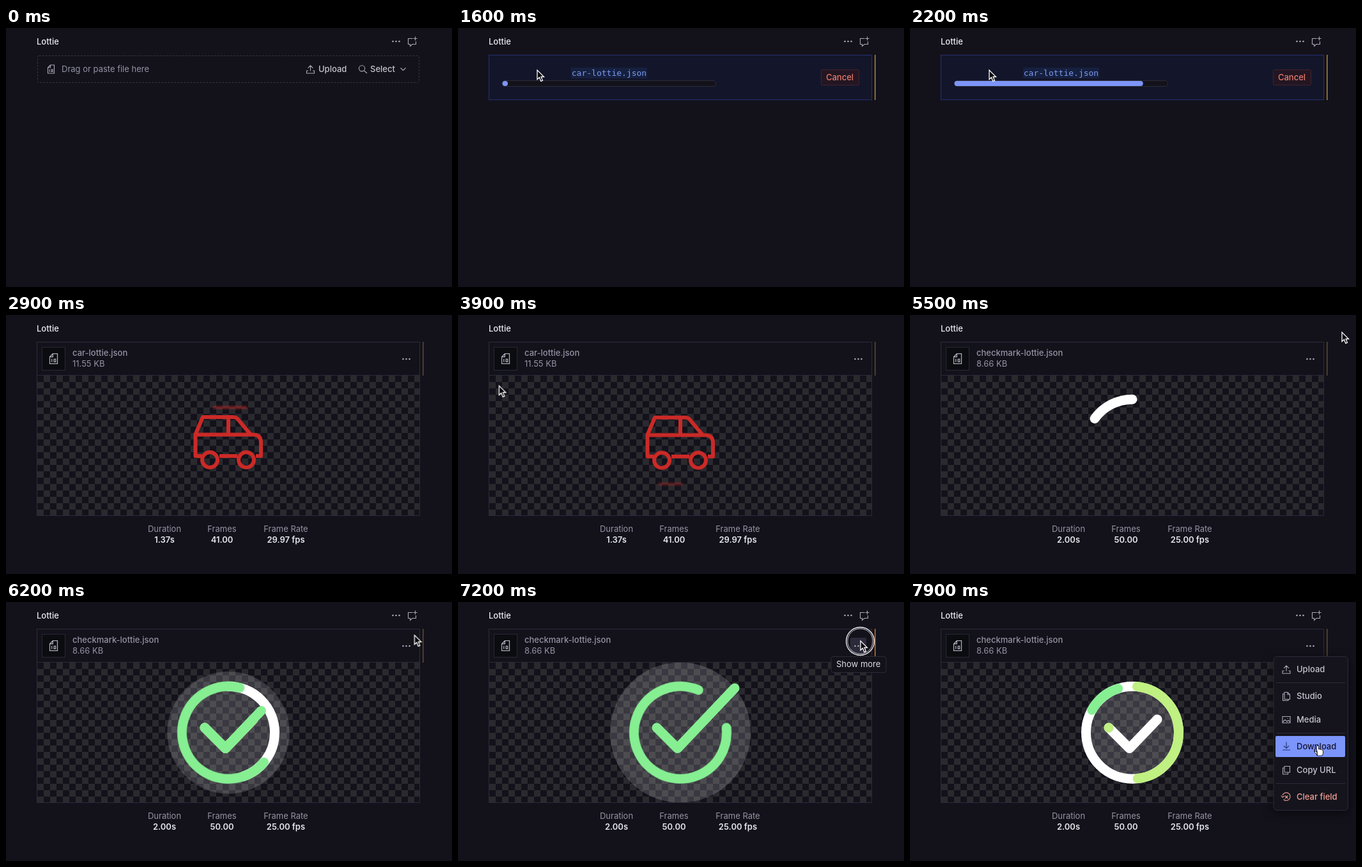
These frames come from a looping animation (698 px wide and 406 px high, 8000 ms). An HTML page:

```html
<!DOCTYPE html>
<html lang="en">
<head>
<meta charset="utf-8">
<title>Lottie upload field</title>
<style>
html, body { margin: 0; width: 100%; height: 100%; overflow: hidden; background: #13121b; }
svg { display: block; width: 698px; height: 406px; font: 13px Inter, sans-serif; }
text { white-space: pre; }
.med { font-weight: 500; }
.bold { font-weight: 600; fill: #e6e6ee; }
.mid { text-anchor: middle; }
.muted { fill: #9493a3; }
.light { fill: #c5c4d0; }
.line { fill: none; stroke: #a9a8b6; stroke-width: 1.1; }
.mono { font-family: "DejaVu Sans Mono", monospace; fill: #7d9af3; }
.panel { fill: none; stroke: #2b2a3a; }
.upload-card { fill: #13162a; stroke: #262f70; }

/* One 8 s scene; all hard switches use step-end */
.sw { animation: 8s step-end infinite; }
.run { animation: 8s linear infinite; }
.empty { animation-name: empty; }
.over1 { animation-name: over1; }
.card { animation-name: card; }
.first { animation-name: first; }
.second { animation-name: second; }
.result { animation-name: result; }
.over2 { animation-name: over2; }
.preview { animation-name: preview; }
.stats { animation-name: stats; }
.tools { animation-name: tools; }
.change-bar { animation-name: change-bar; }
.progress { animation-name: progress; }
.car-on { animation-name: car-on; }
.check-on { animation-name: check-on; }
.hover { animation-name: hover; }
.tip { animation-name: tip; }
.menu { animation-name: menu; }
.pick { animation-name: pick; }
.arrow { animation-name: arrow; }
.hand { animation-name: hand; }
.pointer { animation-name: pointer; }
.click { animation-name: click; transform-origin: 629.5px 61.5px; }

@keyframes empty { 0% { opacity: 1 } 18.75%, to { opacity: 0 } }
@keyframes over1 { 0% { opacity: 0 } 15.5% { opacity: 1 } 18.75%, to { opacity: 0 } }
@keyframes card { 0% { opacity: 0 } 18.75% { opacity: 1 } 30% { opacity: 0 } 55% { opacity: 1 } 65%, to { opacity: 0 } }
@keyframes first { 0% { opacity: 1 } 55%, to { opacity: 0 } }
@keyframes second { 0% { opacity: 0 } 55%, to { opacity: 1 } }
@keyframes result { 0% { opacity: 0 } 30% { opacity: 1 } 55% { opacity: 0 } 65%, to { opacity: 1 } }
@keyframes over2 { 0% { opacity: 0 } 51.25% { opacity: 1 } 55%, to { opacity: 0 } }
@keyframes preview {
  0% { opacity: 0; transform: none }
  30% { opacity: 1; transform: none }
  55% { opacity: 1; transform: translateY(18px) }
  65%, to { opacity: 1; transform: none }
}
@keyframes stats {
  0% { opacity: 0; transform: none }
  30% { opacity: 1; transform: none }
  55% { opacity: 0; transform: none }
  62.5% { opacity: 1; transform: translateY(18px) }
  65%, to { opacity: 1; transform: none }
}
@keyframes tools { 0% { opacity: 1 } 30% { opacity: 0 } 51.25% { opacity: 1 } 65% { opacity: 0 } 77.5%, to { opacity: 1 } }
@keyframes change-bar {
  0% { opacity: 0; height: 71px; fill: #a8843f }
  18.75% { opacity: 1; height: 71px; fill: #a8843f }
  30% { opacity: 1; height: 53px; fill: #5d4a31 }
  55% { opacity: 1; height: 71px; fill: #a8843f }
  65% { opacity: 1; height: 53px; fill: #5d4a31 }
  78.75% { opacity: 1; height: 53px; fill: #bd7439 }
  92.5%, to { opacity: 1; height: 53px; fill: #5d4a31 }
}
@keyframes progress { 0%, 20% { width: 8px } 28.5% { width: 333px } 30%, 56.25% { width: 8px } 64%, to { width: 333px } }
@keyframes car-on { 0% { opacity: 0 } 30% { opacity: 1 } 55%, to { opacity: 0 } }
@keyframes check-on { 0% { opacity: 0 } 66.25%, to { opacity: 1 } }
@keyframes hover { 0% { opacity: 0 } 78.75% { opacity: 1 } 91.25%, to { opacity: 0 } }
@keyframes tip { 0% { opacity: 0 } 82.5% { opacity: 1 } 91.25%, to { opacity: 0 } }
@keyframes menu { 0% { opacity: 0 } 91.25%, to { opacity: 1 } }
@keyframes pick { 0% { opacity: 0 } 96.25%, to { opacity: 1 } }
@keyframes arrow { 0% { opacity: 0 } 12.5% { opacity: 1 } 30% { opacity: 0 } 46.25% { opacity: 1 } 92.5%, to { opacity: 0 } }
@keyframes hand { 0% { opacity: 0 } 92.5%, to { opacity: 1 } }
@keyframes click {
  0%, 88.6% { opacity: 0; transform: scale(.6) }
  90%, 90.6% { opacity: 1; transform: none }
  92%, to { opacity: 0; transform: none }
}
@keyframes pointer {
  0%, 12.5% { transform: translate(-8px, 122px); animation-timing-function: ease-out }
  18%, 30% { transform: translate(124px, 66px) }
  30.1%, 46.25% { transform: translate(-10px, 140px); animation-timing-function: ease-out }
  54%, 57.5% { transform: translate(146px, 79px); animation-timing-function: ease-in-out }
  66.5% { transform: translate(666px, 10px) }
  68.75%, 73.75% { transform: translate(676px, 27px); animation-timing-function: ease-in-out }
  79% { transform: translate(632px, 57px) }
  86%, 91.25% { transform: translate(630px, 61px); animation-timing-function: ease-in-out }
  98%, to { transform: translate(638px, 225px) }
}

/* Car loop */
.car, .streak { animation: 1.33333s linear -.26667s infinite; }
.car { animation-name: bob; fill: none; stroke: #cb2a27; stroke-width: 6; stroke-linejoin: round; }
.streak { stroke: #cb2a27; stroke-width: 5; filter: blur(1px); }
.high { animation-name: high; }
.low { animation-name: low; }
@keyframes bob { 0%, 37.5%, 75%, to { transform: none } 18%, 56% { transform: translateY(1px) } }
@keyframes high {
  0%, 15% { opacity: 0; transform: translateX(48px) }
  37.5% { opacity: .48; transform: none }
  60%, to { opacity: 0; transform: translateX(-48px) }
}
@keyframes low {
  0% { opacity: 0; transform: translateX(70px) }
  18% { opacity: .48; transform: translateX(35px) }
  36%, to { opacity: 0; transform: none }
}

/* Checkmark loop: white, lime and green strokes chase each other */
.tick * { animation: 2s linear -.7s infinite; }
.stroke { fill: none; stroke-width: 15; stroke-linecap: round; stroke-linejoin: round; }
.white { stroke: #fff; }
.lime { stroke: #bff081; }
.green { stroke: #86ef92; }
.tick .disc { animation-name: disc; transform-origin: 348px 204.7px; fill: #fff; fill-opacity: .17; }
.tick .ring.white { animation-name: ring-white; }
.tick .ring.lime { animation-name: ring-lime; }
.tick .ring.green { animation-name: ring-green; }
.tick .mark.white { animation-name: mark-white; }
.tick .mark.lime { animation-name: mark-lime; }
.tick .mark.green { animation-name: mark-green; }
@keyframes disc {
  0%, 14% { transform: scale(0) }
  30% { transform: scale(.67); animation-timing-function: ease-out }
  50% { transform: scale(.89); animation-timing-function: ease-out }
  95%, to { transform: none }
}
@keyframes ring-white {
  0% { stroke-dasharray: 0 999; stroke-dashoffset: 0; animation-timing-function: ease-in }
  10% { stroke-dasharray: 53 999; stroke-dashoffset: 0; animation-timing-function: ease-out }
  30%, 34% { stroke-dasharray: 360 999; stroke-dashoffset: 0; opacity: 1 }
  54% { stroke-dasharray: 0 999; stroke-dashoffset: -360; opacity: 1 }
  54.1%, to { stroke-dasharray: 0 999; stroke-dashoffset: -360; opacity: 0 }
}
@keyframes ring-lime {
  0%, 12% { stroke-dasharray: 0 999; stroke-dashoffset: 0; opacity: 0 }
  12.1% { stroke-dasharray: 0 999; stroke-dashoffset: 0; opacity: 1 }
  30% { stroke-dasharray: 168 999; stroke-dashoffset: -186; opacity: 1 }
  45% { stroke-dasharray: 0 999; stroke-dashoffset: -360; opacity: 1 }
  45.1%, to { stroke-dasharray: 0 999; stroke-dashoffset: -360; opacity: 0 }
}
@keyframes ring-green {
  0%, 22% { stroke-dasharray: 0 999; stroke-dashoffset: -23; opacity: 0 }
  22.1% { stroke-dasharray: 0 999; stroke-dashoffset: -23; opacity: 1 }
  30% { stroke-dasharray: 42 999; stroke-dashoffset: -41; opacity: 1; animation-timing-function: ease-out }
  55%, to { stroke-dasharray: 299 999; stroke-dashoffset: 0; opacity: 1 }
}
@keyframes mark-white {
  0%, 14% { stroke-dasharray: 0 999; opacity: 0 }
  14.1% { stroke-dasharray: 0 999; opacity: 1; animation-timing-function: ease-out }
  30%, 50% { stroke-dasharray: 110 999; opacity: 1 }
  50.1%, to { stroke-dasharray: 110 999; opacity: 0 }
}
@keyframes mark-lime {
  0%, 28.9% { stroke-dasharray: 0 999; opacity: 0 }
  29%, 30% { stroke-dasharray: 0 999; opacity: 1 }
  44%, 50% { stroke-dasharray: 110 999; opacity: 1 }
  50.1%, to { stroke-dasharray: 110 999; opacity: 0 }
}
@keyframes mark-green {
  0%, 34.9% { stroke-dasharray: 0 999; opacity: 0 }
  35% { stroke-dasharray: 0 999; opacity: 1; animation-timing-function: ease-out }
  54%, to { stroke-dasharray: 178 999; opacity: 1 }
}
</style>
</head>
<body>
<svg viewBox="0 0 698 406">
  <defs>
    <pattern id="checker" x="49" y="95" width="20" height="20" patternUnits="userSpaceOnUse">
      <path d="M10 0h10v10H10zM0 10h10v10H0z" fill="#29292e"/>
    </pattern>
    <clipPath id="stage"><path d="M49 95h598v219H49z"/></clipPath>
    <g id="dots"><circle cx="-5" r="1.3"/><circle r="1.3"/><circle cx="5" r="1.3"/></g>
    <path id="file" d="M-1-6.5H5V6.5H-5V-2.5ZM-1-6.5V-2.5H-5M-2.3 .3V4.4M.6 .5H2.6V4H.6Z"/>
    <path id="upload" d="M-3.5 2.5H-6V6.5H6V2.5H3.5M0 3V-5.5M-4-1.7L0-5.7L4-1.7"/>
    <path id="ring" pathLength="360" d="M348 132.2a72.5 72.5 0 0 0 0 145a72.5 72.5 0 0 0 0-145"/>
  </defs>
  <rect width="698" height="406" fill="#13121b"/>

  <text class="med" x="48" y="26" fill="#ecebf2">Lottie</text>
  <g class="sw tools">
    <use href="#dots" x="610.5" y="21" fill="#a9a8b6"/>
    <path class="line" d="M636.500 16.500H629.500V25.500H632.500V28.500L636 25.500H641.500V21M640.500 13.500V19.500M637.500 16.500H643.500"/>
  </g>

  <g class="sw empty">
    <rect x="49.500" y="43.500" width="597" height="42" rx="2" fill="none" stroke="#353442" stroke-dasharray="3 2"/>
    <rect class="sw over1 upload-card" x="48.500" y="42.500" width="599" height="43"/>
    <use class="line" href="#file" x="70.500" y="64.500"/>
    <text class="muted" x="87" y="69">Drag or paste file here</text>
    <use class="line" href="#upload" x="476.500" y="64.500"/>
    <text class="med light" x="489" y="69">Upload</text>
    <path class="line" d="M560.500 67l4.500 4M617.500 62.500l4 4 4-4"/>
    <circle class="line" cx="557" cy="63.300" r="4.600"/>
    <text class="med light" x="570" y="69">Select</text>
  </g>

  <g class="sw preview">
    <rect x="49" y="95" width="598" height="219" fill="url(#checker)"/>
    <rect class="panel" x="48.500" y="94.500" width="599" height="220"/>
  </g>

  <g class="sw car-on">
    <path class="streak high" d="M324 145h53"/>
    <path class="streak low" d="M268 265h38" stroke-width="3"/>
    <g class="car">
      <path d="M306 221H296.500V187L308 160H356Q360 160 363 163.500L383 187.500H388Q399 188 399 200V221H391M334 221H362M296.500 187.500H388M348 160V187.500"/>
      <circle cx="319" cy="227" r="12"/><circle cx="376" cy="227" r="12"/>
    </g>
  </g>

  <g class="sw check-on" clip-path="url(#stage)">
    <g class="tick">
      <circle class="disc" cx="348" cy="204.700" r="110"/>
      <use class="stroke ring white" href="#ring"/>
      <use class="stroke ring lime" href="#ring"/>
      <use class="stroke ring green" href="#ring" transform="rotate(23 348 204.700)"/>
      <path class="stroke mark white" d="M311 197L343.500 229.500L387 184"/>
      <path class="stroke mark lime" d="M311 197L343.500 229.500L387 184"/>
      <path class="stroke mark green" d="M311 197L343.500 229.500L433 135"/>
    </g>
  </g>

  <g class="sw result">
    <rect class="panel" x="48.500" y="42.500" width="599" height="52"/>
    <rect class="sw over2 upload-card" x="48.500" y="42.500" width="599" height="52"/>
    <rect x="56.500" y="50.500" width="36" height="36" fill="#0b0c10" stroke="#292834"/>
    <use class="line" href="#file" transform="translate(74.500 68.500) scale(1.200)"/>
    <g class="muted">
      <g class="sw first"><text class="med" x="104" y="64">car-lottie.json</text><text x="104" y="81">11.55 KB</text></g>
      <g class="sw second"><text class="med" x="104" y="64">checkmark-lottie.json</text><text x="104" y="81">8.66 KB</text></g>
    </g>
    <rect class="sw hover" x="614" y="56" width="25" height="25" rx="2" fill="#2a2a3a"/>
    <use href="#dots" x="626.500" y="69" fill="#a9a8b6"/>
  </g>

  <g class="sw stats mid">
    <g class="muted"><text x="248" y="340">Duration</text><text x="338" y="340">Frames</text><text x="438" y="340">Frame Rate</text></g>
    <g class="bold sw first"><text x="248" y="357">1.37s</text><text x="338" y="357">41.00</text><text x="438" y="357">29.97 fps</text></g>
    <g class="bold sw second"><text x="248" y="357">2.00s</text><text x="338" y="357">50.00</text><text x="438" y="357">25.00 fps</text></g>
  </g>

  <g class="sw card">
    <rect class="upload-card" x="48.500" y="42.500" width="599" height="70"/>
    <g class="sw first"><rect x="177" y="62" width="119" height="17" fill="#16203f"/><text class="mono mid" x="236.500" y="75">car-lottie.json</text></g>
    <g class="sw second"><rect x="154" y="62" width="166" height="17" fill="#16203f"/><text class="mono mid" x="236.500" y="75">checkmark-lottie.json</text></g>
    <rect x="69.500" y="82.500" width="334" height="9" rx="4.500" fill="#13121b" stroke="#2c2c36"/>
    <rect class="run progress" x="69.500" y="83" width="8" height="8" rx="4" fill="#7d95f8"/>
    <rect x="568.500" y="65.500" width="59" height="24" rx="2" fill="#231622" stroke="#45212b"/>
    <text class="med mid" x="597.500" y="82" fill="#e67c6f">Cancel</text>
  </g>

  <rect class="sw change-bar" x="652" y="42" width="1.500" height="71"/>

  <g class="sw tip">
    <rect x="584" y="85.500" width="86" height="25" rx="3" fill="#13121b" stroke="#2b2a38"/>
    <text x="592" y="102" fill="#dcdbe5">Show more</text>
  </g>

  <g class="sw menu">
    <rect x="569" y="85.500" width="116.500" height="241" rx="5" fill="#15141d" stroke="#2b2a38" style="filter: drop-shadow(0 4px 8px #0008)"/>
    <path d="M573 126.500H681M573 205.500H681M573 284.500H681" stroke="#2b2a38"/>
    <g class="med light">
      <text x="605" y="110">Upload</text><text x="605" y="152">Studio</text><text x="605" y="189">Media</text>
      <text x="605" y="231">Download</text><text x="605" y="268">Copy URL</text><text x="605" y="310" fill="#f2a093" style="fill: #f2a093">Clear field</text>
    </g>
    <use class="line" href="#upload" x="589" y="105.500"/>
    <path class="line" d="M586 141.500H591L594.500 145V152.500H586ZM591 141.500V145H594.500M586 144H583.500V154.500H592V152.500"/>
    <path class="line" d="M583 179.500H595V189.500H583ZM583.500 188L587 184.500L590 187.500L592 185.500L595 188M590.500 182.500h1"/>
    <path class="line" d="M589 219.500V229M585 225.500L589 229.300L593 225.500M583 232H595"/>
    <path class="line" d="M586 257.500H594.500V267H586ZM586 260H583.500V270H591.500V267"/>
    <path class="line" d="M583 303A6.200 6.200 0 1 1 584.500 309.500M580.800 303.500L583 306.300L586 304M587 303.500L591.500 308M591.500 303.500L587 308" style="stroke: #f2a093"/>
    <g class="sw pick">
      <rect x="572" y="210" width="109" height="33" rx="2" fill="#7c95fb"/>
      <path class="line" style="stroke: #263271" d="M589 219.500V229M585 225.500L589 229.300L593 225.500M583 232H595"/>
      <text class="med" x="605" y="231" fill="#14142a">Download</text>
    </g>
  </g>

  <g class="run click" fill="none" stroke="#f2f2f5">
    <circle cx="629.500" cy="61.500" r="22" stroke-width="1.300"/>
    <circle cx="629.500" cy="61.500" r="19.800" stroke-width=".8"/>
  </g>

  <g class="run pointer">
    <path class="sw arrow" d="M0 0V14.500L3.400 11.400L5.800 17.400L8.400 16.300L6 10.500H10.500Z" fill="#08080c" stroke="#fff" stroke-width="1.300"/>
    <path class="sw hand" d="M-1.500 1Q0-1 1.500 1V6Q3 4.500 4.200 6.300Q5.800 5.200 6.700 7Q8.700 6.500 8.500 9V12Q8 14 7 16H-.5Q-2-.0 -.5 16Q-2 13-5 10Q-4-.0 -5 10Q-4 7.500-1.500 10Z" fill="#fff" stroke="#14142a" stroke-width=".9"/>
  </g>
</svg>
</body>
</html>
```
